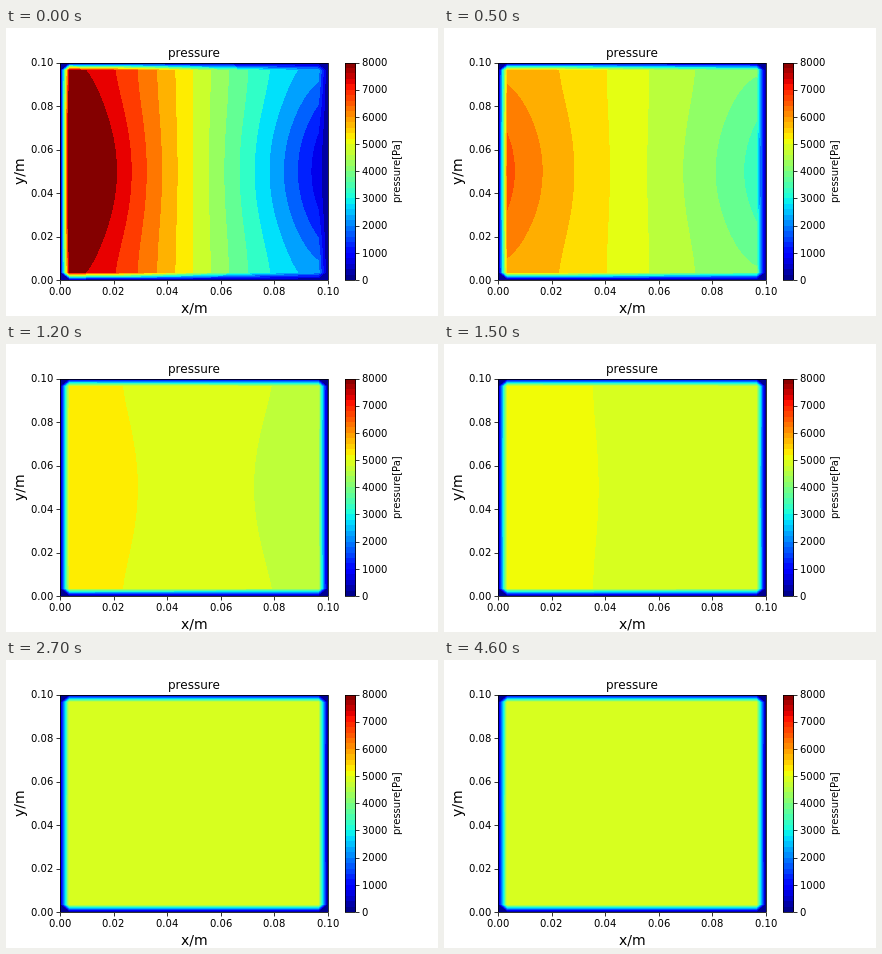
An HTML page with a canvas for the animation above (5000 ms loop, 432 by 288 pixels).

```html
<!DOCTYPE html>
<html lang="en">
<head>
<meta charset="utf-8">
<title>Pressure field</title>
<style>
  html, body { margin: 0; width: 100%; height: 100%; overflow: hidden; background: #fff; }
  canvas { display: block; width: 432px; height: 288px; }
</style>
</head>
<body>
<canvas id="stage" width="432" height="288"></canvas>
<script>
const ctx = document.getElementById('stage').getContext('2d');

const LOOP = 5000, STEP = 100, LAST = 27, VMAX = 8000, CELLS = 29;
const plot = { x: 54, y: 34.56, w: 267.84, h: 217.44 };
const bottom = plot.y + plot.h;
const cell = { w: plot.w / CELLS, h: plot.h / CELLS };
const mid = { x: plot.x + plot.w / 2, y: plot.y + plot.h / 2 };
const half = { x: plot.w / 2 - cell.w, y: plot.h / 2 - cell.h };

const clamp = (v, lo, hi) => Math.min(hi, Math.max(lo, v));

// Jet colour map in 256 shades, t from 0 to 1
function jet(t) {
  const v = Math.floor(t * 256) / 255;
  const r = v < 0.89 ? (v - 0.35) / 0.31 : 1 - (v - 0.89) / 0.22;
  const g = Math.min((v - 0.125) / 0.25, (0.91 - v) / 0.27);
  const b = v < 0.11 ? 0.5 + v / 0.22 : (0.65 - v) / 0.31;
  return [r, g, b].map(c => Math.round(255 * clamp(c, 0, 1)));
}

// Decaying pressure difference between the left and right walls
function stateAt(n) {
  return {
    mean: 4951 + 26 * Math.exp(-n / 7),
    slope: 32 * Math.exp(-0.224 * n + 0.0009 * n * n),
    bend: 0.18 - 0.12 * Math.exp(-n / 3)
  };
}

function pressure(s, dx, dy) {
  const q = (dx / 120) ** 2;
  const centre = 1 + s.bend * q;
  const edge = 0.89 * (1 - 0.22 * q);
  const y = dy / half.y, y2 = y * y;
  const nearWall = (dx / half.x) ** 2;
  const bulge = (1 - nearWall) * (1 + Math.cos(Math.PI * y)) / 2
              + nearWall * (1 - 1.3 * y2 + 0.3 * y2 * y2);
  return s.mean - s.slope * dx * (edge + (centre - edge) * bulge);
}

function bandStep(max) {
  return [250, 300, 400, 500].find(d => d * 21 >= max) || 500;
}

function drawField(n) {
  const s = stateAt(n);
  const band = bandStep(pressure(s, -half.x, 0));
  const x0 = 54, y0 = 35, w = 268, h = 217;
  const img = ctx.createImageData(w, h);
  const colours = [];
  let k = 0;
  for (let j = 0; j < h; j++) {
    const y = y0 + j + 0.5;
    const dy = clamp(y - mid.y, -half.y, half.y);
    const v = clamp(Math.min(y - plot.y, bottom - y) / cell.h, 0, 1);
    for (let i = 0; i < w; i++) {
      const x = x0 + i + 0.5;
      const dx = clamp(x - mid.x, -half.x, half.x);
      const u = clamp(Math.min(x - plot.x, plot.x + plot.w - x) / cell.w, 0, 1);
      // the outermost ring of nodes is at zero
      const p = pressure(s, dx, dy) * Math.max(0, u + v - 1);
      const b = Math.floor(p / band);
      if (!colours[b]) {
        const level = (b + 0.5) * band;
        colours[b] = jet((level > 7600 ? 7950 : level) / VMAX);
      }
      const c = colours[b];
      img.data[k++] = c[0];
      img.data[k++] = c[1];
      img.data[k++] = c[2];
      img.data[k++] = 255;
    }
  }
  ctx.putImageData(img, x0, y0);
}

function drawColourBar() {
  const bands = 40;
  for (let y = 35; y < bottom; y++) {
    const b = clamp(Math.floor((bottom - y - 0.5) / plot.h * bands), 0, bands - 1);
    ctx.fillStyle = `rgb(${jet((b + 0.5) / bands)})`;
    ctx.fillRect(339, y, 11, 1);
  }
}

function line(x1, y1, x2, y2) {
  ctx.beginPath();
  ctx.moveTo(x1, y1);
  ctx.lineTo(x2, y2);
  ctx.stroke();
}

// Text starts on a whole pixel; align is 0 for left, 0.5 for centre, 1 for right
function text(str, x, y, size, align, turned) {
  ctx.save();
  ctx.font = `${size}px "DejaVu Sans", sans-serif`;
  const shift = ctx.measureText(str).width * align;
  if (turned) {
    ctx.translate(x, Math.round(y + shift));
    ctx.rotate(-Math.PI / 2);
  } else {
    ctx.translate(Math.round(x - shift), y);
  }
  ctx.fillText(str, 0, 0);
  ctx.restore();
}

function drawAxes() {
  ctx.strokeStyle = ctx.fillStyle = '#000';
  ctx.lineWidth = 0.8;
  ctx.strokeRect(54.5, 35.5, 268, 217);
  ctx.strokeRect(339.5, 35.5, 10, 217);

  for (let i = 0; i <= 5; i++) {
    const label = (i * 0.02).toFixed(2);
    const x = plot.x + plot.w * i / 5;
    const y = bottom - plot.h * i / 5;
    const tx = Math.round(x) + 0.5, ty = Math.round(y) + 0.5;
    line(tx, 253, tx, 256.5);
    line(50.5, ty, 54, ty);
    text(label, x, 267, 10, 0.5);
    text(label, 47, Math.round(y + 3.7), 10, 1);
  }
  for (let i = 0; i <= 8; i++) {
    const y = bottom - plot.h * i / 8;
    const ty = Math.round(y) + 0.5;
    line(350, ty, 353.5, ty);
    text(String(i * 1000), 356, Math.round(y + 3.7), 10, 0);
  }
  text('pressure', mid.x, 29, 12, 0.5);
  text('x/m', mid.x, 285, 14, 0.5);
  text('y/m', 18, mid.y, 14, 0.5, true);
  text('pressure[Pa]', 394, mid.y, 10, 0.5, true);
}

function draw(n) {
  ctx.fillStyle = '#fff';
  ctx.fillRect(0, 0, 432, 288);
  drawField(n);
  drawColourBar();
  drawAxes();
}

const start = performance.now();
let shown = -1;
function tick() {
  const t = (performance.now() - start) % LOOP;
  const n = Math.min(LAST, Math.floor(t / STEP));
  if (n !== shown) draw(shown = n);
  requestAnimationFrame(tick);
}
tick();
</script>
</body>
</html>
```
